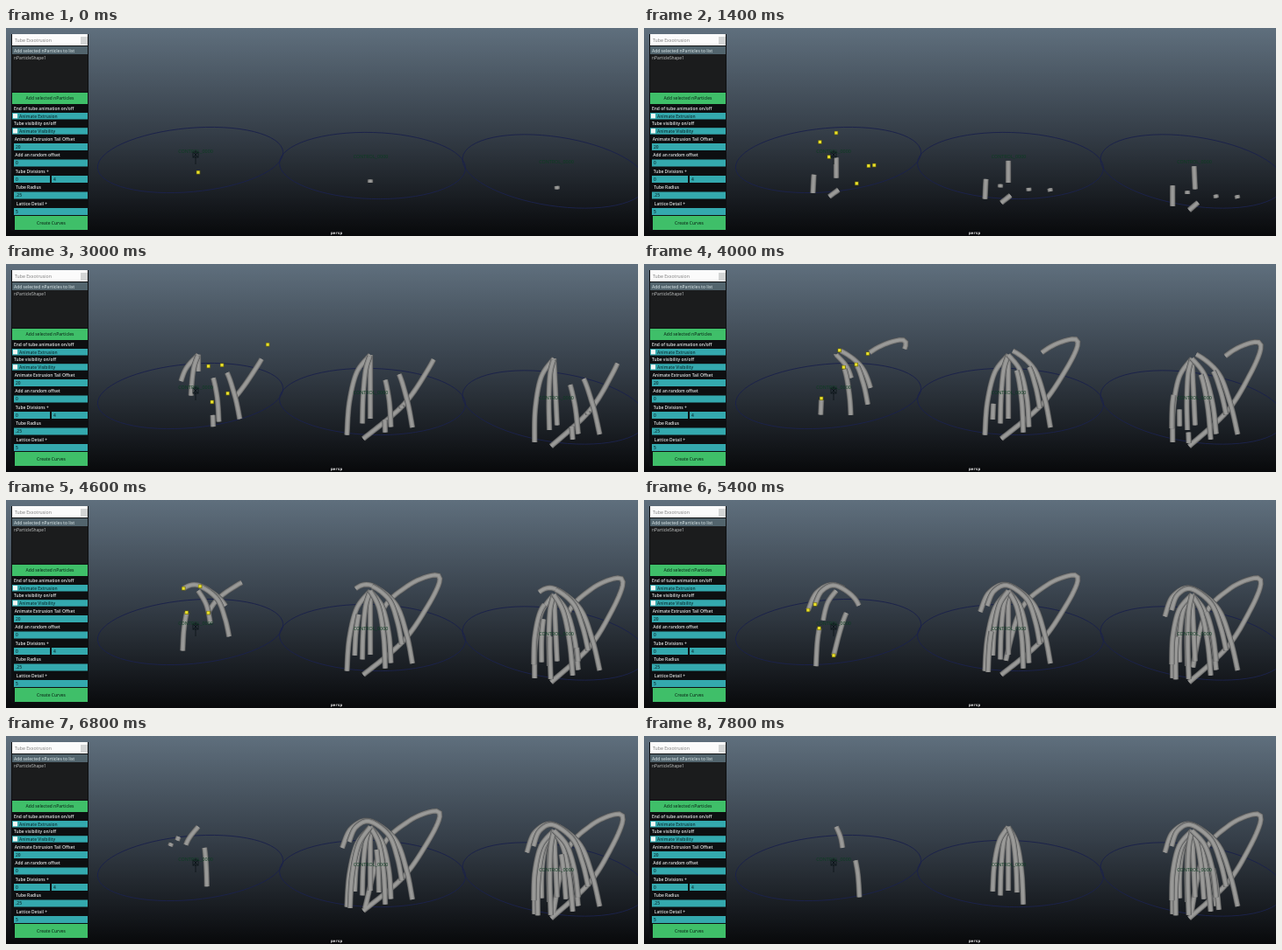
An HTML page with a canvas for the animation above (8 s loop, 720x238 px).

```html
<!DOCTYPE html>
<html lang="en">
<head>
<meta charset="utf-8">
<title>Tube extrusion</title>
<style>
  html, body { margin: 0; width: 100%; height: 100%; overflow: hidden; background: #111; }
  canvas { display: block; width: 720px; height: 238px; }
</style>
</head>
<body>
<canvas id="stage" width="720" height="238"></canvas>
<script>
const ctx = document.getElementById('stage').getContext('2d');
const LOOP = 8000, STEP = 200;
const TEAL = '#34a9ae', GREEN = '#3fbf69', INK = '#0c3438';
const APEX = { x: 415, y: 104 };

// Each view maps the shared tube layout to its place on the stage.
const views = {
  left: (x, y) => [x - 196, y - (y - 100) * 0.07],
  middle: (x, y) => [x, y],
  right: (x, y) => [x + 209 + (y - 100) * 0.05, y + 4 + (y - 100) * 0.045]
};

const clamp = v => Math.min(1, Math.max(0, v));
const mix = (a, b, u) => a + (b - a) * u;

function spline(points) {
  const last = points.length - 1;
  const at = i => points[Math.min(last, Math.max(0, i))];
  return Array.from({ length: last * 12 + 1 }, (_, step) => {
    const i = Math.floor(step / 12), u = step / 12 - i;
    return [0, 1].map(k => {
      const [a, b, c, d] = [at(i - 1)[k], at(i)[k], at(i + 1)[k], at(i + 2)[k]];
      return b + 0.5 * u * (c - a + u * (2 * a - 5 * b + 4 * c - d + u * (3 * (b - c) + d - a)));
    });
  });
}

// An inner tube rises from a scattered base and bends into the apex.
function rise(i) {
  const x = APEX.x - 27 * Math.sin(1.4 * i), y = 187 - 10 * Math.cos(2.6 * i);
  return spline([[x, y], [mix(x, APEX.x, 0.1), mix(y, APEX.y, 0.4)],
    [mix(x, APEX.x, 0.42), mix(y, APEX.y, 0.78)], [APEX.x, APEX.y]]);
}

function makeTube(points, start, duration, delay, options = {}) {
  const lengths = [0];
  for (let i = 1; i < points.length; i++)
    lengths.push(lengths[i - 1] + Math.hypot(points[i][0] - points[i - 1][0], points[i][1] - points[i - 1][1]));
  return { points, lengths, total: lengths.at(-1), start, duration, delay, ...options };
}

const sweep = spline([[407, 200], [452, 162], [480, 122], [494, 93],
  [487, 86], [458, 98], [428, 128], [409, 197]]);
const arch = spline([[463, 187], [456, 152], [443, 118], [414, 97], [393, 106], [383, 128]]);
const innerArch = arch.map(([x, y]) => [mix(APEX.x, x, 0.75), mix(100, y, 0.75)]);

const tubes = [
  makeTube(sweep, 1200, 4400, 800, { hide: 7400 }),
  makeTube(arch, 1400, 4000, 1500, { hide: 7400 }),
  makeTube(innerArch, 3000, 2400, 1500, { hide: 7400 })
];
for (let i = 0; i < 9; i++) {
  const points = rise(i);
  const wide = Math.abs(points[0][0] - APEX.x) > 20;
  tubes.push(makeTube(points, 850 + 180 * i ** 1.7, 1600, 1000, { hide: wide ? 7600 : Infinity }));
}
for (let i = 0; i < 3; i++)
  tubes.push(makeTube(rise(i + 10), 3300 + 500 * i, 1600, 1000, { only: 'right' }));

function pointAt(tube, progress) {
  const goal = clamp(progress) * tube.total;
  const i = Math.max(1, tube.lengths.findIndex(length => length >= goal - 1e-6));
  const u = (goal - tube.lengths[i - 1]) / (tube.lengths[i] - tube.lengths[i - 1]);
  return [0, 1].map(k => mix(tube.points[i - 1][k], tube.points[i][k], u));
}

function drawTube(tube, from, to, place) {
  const steps = Math.max(2, Math.ceil((to - from) * 70));
  ctx.beginPath();
  for (let i = 0; i <= steps; i++) ctx.lineTo(...place(...pointAt(tube, mix(from, to, i / steps))));
  for (const [color, width] of [['#505253', 6.4], ['#828281', 5.2], ['#9a9a98', 3]]) {
    ctx.strokeStyle = color;
    ctx.lineWidth = width;
    ctx.stroke();
  }
}

function drawView(name, t) {
  const place = views[name], isLeft = name === 'left';
  const lead = Math.max(0, 1000 - t * 0.24);
  const active = tubes.filter(tube => (!tube.only || tube.only === name) && t + lead > tube.start);
  for (const tube of active) {
    const age = t - tube.start;
    if (name === 'middle' && t >= tube.hide || isLeft && age <= 0) continue;
    const head = clamp(Math.max(3.5 / tube.total, age / tube.duration));
    const tail = isLeft ? clamp((age - tube.delay) / tube.duration) : 0;
    if (head - tail > 0.005) drawTube(tube, tail, head, place);
  }
  if (!isLeft || t >= 6000) return;
  for (const tube of active) {
    const progress = (t - tube.start + lead) / tube.duration;
    if (progress > 1.1) continue;
    const [x, y] = place(...pointAt(tube, progress));
    box(x - 2.2, y - 2.2, 4.4, 4.4, '#6b6808');
    box(x - 1.7, y - 1.7, 3.2, 3.2, '#e9df2c');
  }
}

function text(value, x, y, color = '#e4e6e6', { size = 4.9, weight = 600, align = 'left' } = {}) {
  ctx.font = `${weight} ${size}px "Open Sans", sans-serif`;
  ctx.textAlign = align;
  ctx.fillStyle = color;
  ctx.fillText(value, x, y);
}

function box(x, y, w, h, color) {
  ctx.fillStyle = color;
  ctx.fillRect(x, y, w, h);
}

function drawBackground() {
  const shade = ctx.createLinearGradient(0, 0, 0, 238);
  shade.addColorStop(0, '#5f6f7d');
  shade.addColorStop(0.5, '#353e48');
  shade.addColorStop(1, '#08090b');
  box(0, 0, 720, 238, shade);
  ctx.strokeStyle = '#1b224a';
  ctx.lineWidth = 1;
  for (let i = 0; i < 3; i++) {
    ctx.beginPath();
    ctx.ellipse(210 + 207.5 * i, 151 + 6.5 * i, 106, 36.5 + 1.5 * i, -0.09 + 0.12 * i, 0, Math.PI * 2);
    ctx.stroke();
  }
}

function drawEmitter() {
  ctx.strokeStyle = '#0b1418';
  ctx.lineWidth = 0.8;
  ctx.strokeRect(213, 142, 6, 6);
  ctx.beginPath();
  for (const [x, y, dx, dy] of [[213, 142, 6, 6], [219, 142, -6, 6], [216, 140, 0, 16]]) {
    ctx.moveTo(x, y);
    ctx.lineTo(x + dx, y + dy);
  }
  ctx.stroke();
}

function button(label, x, y, h) {
  box(x, y, 93 - x, h, GREEN);
  text(label, (x + 93) / 2, y + h / 2 + 1.9, '#123c23', { align: 'center' });
}

function field(value, x, y, w) {
  box(x, y, w, 8, TEAL);
  text(value, x + 2, y + 5.8, INK);
}

function drawPanel() {
  box(6, 7, 88, 225, '#0d0f11');
  box(7, 7, 86, 13, '#fbfbfb');
  text('Tube Exxotrusion', 10, 15.8, '#777', { size: 5.2, weight: 400 });
  box(85, 10, 8, 9, '#d3d5d5');
  box(7, 21, 86, 9, '#52646d');
  text('Add selected nParticles to list', 9, 27.6, '#c3d0d3');
  box(7, 30, 86, 43, '#1b1c1d');
  text('nParticleShape1', 9, 36.3, '#c8caca', { weight: 400 });
  button('Add selected nParticles', 7, 74, 13);

  [['End of tube animation on/off', 'Animate Extrusion'],
   ['Tube visibility on/off', 'Animate Visibility']].forEach(([heading, option], i) => {
    const y = 94.2 + 17.2 * i;
    text(heading, 9, y);
    box(7, y + 2.8, 86, 7.5, TEAL);
    box(8, y + 3.8, 5, 5.3, '#f2f6f4');
    text(option, 15, y + 8.4, INK);
  });

  [['Animate Extrusion Tail Offset', '20'], ['Add an random offset', '0'], ['Tube Divisions +', '0', '4'],
   ['Tube Radius', '.25'], ['Lattice Detail +', '5']].forEach(([label, first, second], i) => {
    const y = 128.8 + 18.5 * i;
    text(label, 9.8 + 0.5 * i, y);
    field(first, 9, y + 3.2, second ? 41 : 84);
    if (second) field(second, 52, y + 3.2, 41);
  });
  button('Create Curves', 10, 215, 16);
}

function draw(t) {
  drawBackground();
  for (const name in views) drawView(name, t);
  drawEmitter();
  for (const [x, y] of [[216, 143], [415.5, 148.5], [627, 154.5]])
    text('CONTROL_0000', x, y, '#0b3d20', { size: 5.4, weight: 400, align: 'center' });
  drawPanel();
  ctx.font = 'bold 4.3px "DejaVu Sans Mono", monospace';
  ctx.fillStyle = '#f0f0f0';
  ctx.textAlign = 'center';
  ctx.fillText('persp', 376.5, 235.6);
}

function tick() {
  draw(Math.floor(performance.now() % LOOP / STEP) * STEP);
  requestAnimationFrame(tick);
}
tick();
</script>
</body>
</html>
```
